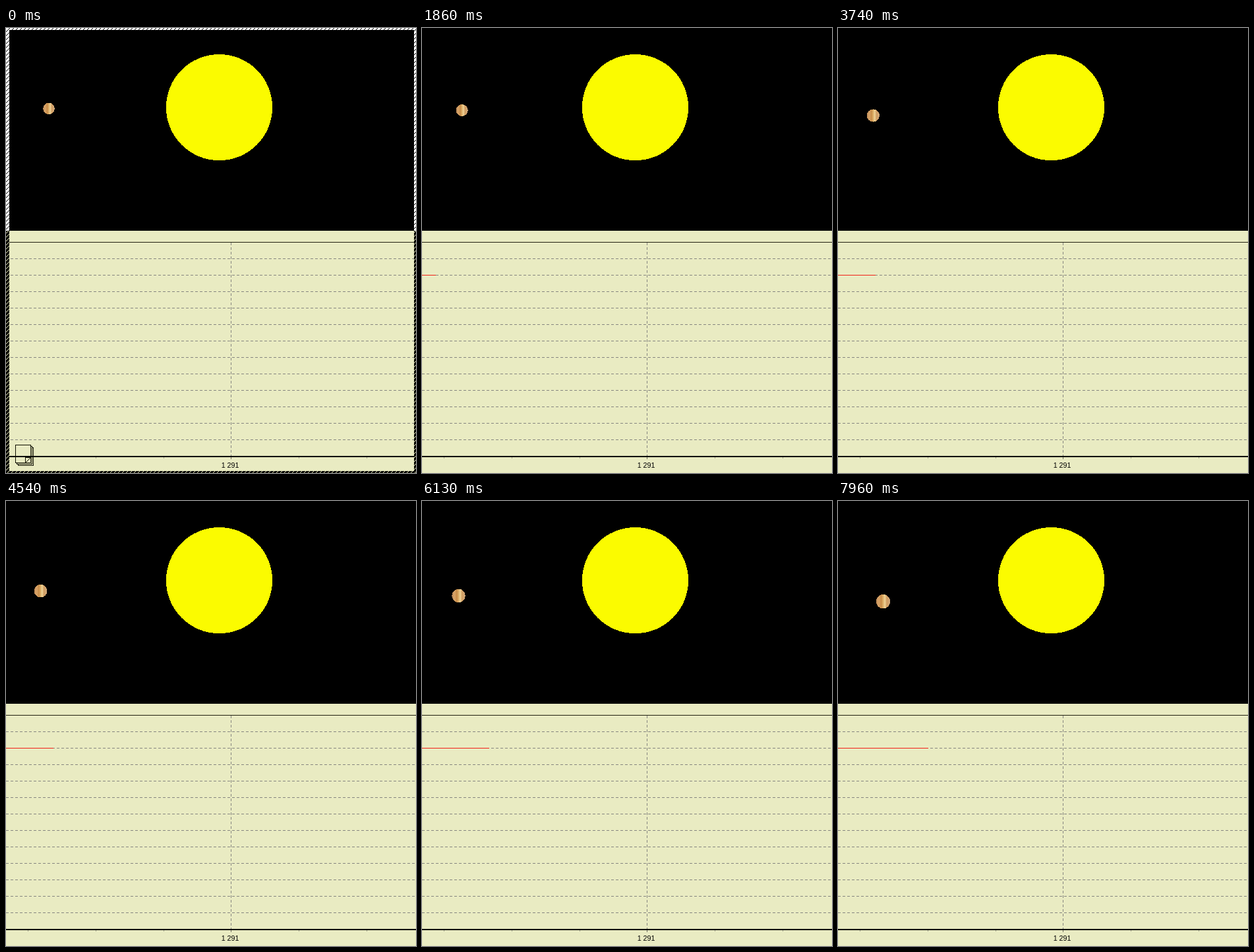
These frames come from a looping animation (622x676 px, 8 s). An HTML page:

```html
<!DOCTYPE html>
<html lang="en">
<head>
<meta charset="utf-8">
<title>Transit</title>
<style>
html, body { margin: 0; width: 100%; height: 100%; overflow: hidden; background: #000; }
svg { display: block; width: 622px; height: 676px; }
text { font: 10.7px "Liberation Sans", Arial, sans-serif; }
</style>
</head>
<body>
<svg viewBox="0 0 622 676">
  <defs>
    <pattern id="hatchTop" width="6" height="6" patternUnits="userSpaceOnUse">
      <rect width="6" height="6" fill="#fff"/>
      <path d="M-1 7L7 -1M-1 1L1 -1M5 7L7 5" stroke="#000"/>
    </pattern>
    <pattern id="hatchLow" width="6" height="6" patternUnits="userSpaceOnUse">
      <rect width="6" height="6" fill="#080800"/>
      <path d="M-1 7L7 -1M-1 1L1 -1M5 7L7 5" stroke="#e9ebc2"/>
    </pattern>
    <linearGradient id="bands">
      <stop offset="0" stop-color="#c08c58"/>
      <stop offset=".2" stop-color="#d8a468"/>
      <stop offset=".36" stop-color="#c88c48"/>
      <stop offset=".5" stop-color="#deb068"/>
      <stop offset=".62" stop-color="#f0d498"/>
      <stop offset=".76" stop-color="#d09c60"/>
      <stop offset="1" stop-color="#d4ac80"/>
    </linearGradient>
  </defs>
  <rect width="622" height="676" fill="#000"/>
  <circle cx="323.5" cy="120.6" r="80.6" fill="#fbfb00" shape-rendering="crispEdges"/>
  <circle id="planet" fill="url(#bands)" shape-rendering="crispEdges"/>
  <rect y="308" width="622" height="368" fill="#e9ebc2"/>
  <g id="grid" fill="none" shape-rendering="crispEdges"></g>
  <path id="curve" stroke="#f02018" shape-rendering="crispEdges"/>
  <text x="340" y="668" text-anchor="middle">1 291</text>
  <g id="selection">
    <path d="M0 0H622V308H619V3H5V308H0Z" fill="url(#hatchTop)"/>
    <path d="M0 308H5V673H619V308H622V676H0Z" fill="url(#hatchLow)"/>
    <path d="M14.5 633.5H37.5V660.5H14.5ZM29.5 660.5V652.5H37.5M29.5 660.5L37.5 652.5M16.5 660.5V662.5H39.5V635.5H37.5M18.5 662.5V664.5H41.5V637.5H39.5"
      fill="none" stroke="#101000" shape-rendering="crispEdges"/>
  </g>
</svg>
<script>
const LOOP = 8000;
const el = id => document.getElementById(id);

// time, x, y, radius along the visible arc of the orbit
const orbit = [
  [1150, 65, 122.4, 8.8],
  [2730, 56.6, 128.5, 9.2],
  [3740, 53.4, 133, 9.6],
  [5370, 53.3, 140.5, 10],
  [6910, 59.7, 147.5, 10.4],
  [7960, 68.5, 152.6, 10.7]
];

function chord(i, k) {
  const a = orbit[i], b = orbit[i + 1];
  return (b[k] - a[k]) / (b[0] - a[0]);
}

// Three-point slope, so that a parabola is followed exactly
function slope(i, k) {
  const n = orbit.length - 1;
  if (i === 0) return 2 * chord(0, k) - slope(1, k);
  if (i === n) return 2 * chord(n - 1, k) - slope(n - 1, k);
  const before = orbit[i][0] - orbit[i - 1][0];
  const after = orbit[i + 1][0] - orbit[i][0];
  return (chord(i - 1, k) * after + chord(i, k) * before) / (before + after);
}

function along(t, k) {
  if (t <= orbit[0][0]) return orbit[0][k];
  let i = 0;
  while (i < orbit.length - 2 && t > orbit[i + 1][0]) i++;
  const a = orbit[i], b = orbit[i + 1], span = b[0] - a[0];
  const u = Math.min(1, (t - a[0]) / span), v = 1 - u;
  return v * v * (1 + 2 * u) * a[k] + u * u * (3 - 2 * u) * b[k]
    + span * u * v * (v * slope(i, k) - u * slope(i + 1, k));
}

function curveEnd(t) {
  if (t < 50) return 0;
  if (t < 1150) return Math.min(7, 1 + (t - 50) / 45);
  return 8 + (Math.min(t, 7960) - 1150) * 0.01894;
}

function buildGrid() {
  let rows = "", ticks = "";
  for (let i = 1; i <= 12; i++) rows += `M0 ${Math.floor(325 + i * 25.08) + 0.5}H622`;
  for (let i = 0; i < 6; i++) ticks += `M${Math.round(33 + i * 102.8) + 0.5} 652V654`;
  el("grid").innerHTML =
    `<path d="${rows}M341.5 326V650" stroke="#868680" stroke-dasharray="4 3"/>
     <path d="M0 325.5H622" stroke="#202010"/>
     <path d="${ticks}" stroke="#a8a890"/>
     <path d="M0 651H622" stroke="#000" stroke-width="2"/>
     <path d="M341.5 652V655" stroke="#707060"/>`;
}

function draw(t) {
  const planet = el("planet");
  ["cx", "cy", "r"].forEach((name, i) => planet.setAttribute(name, along(t, i + 1).toFixed(2)));
  el("curve").setAttribute("d", `M0 375.5H${Math.round(curveEnd(t))}`);
  el("selection").setAttribute("visibility", t < 50 ? "visible" : "hidden");
}

buildGrid();
const start = performance.now();
function tick() {
  draw((performance.now() - start) % LOOP);
  requestAnimationFrame(tick);
}
tick();
</script>
</body>
</html>
```
